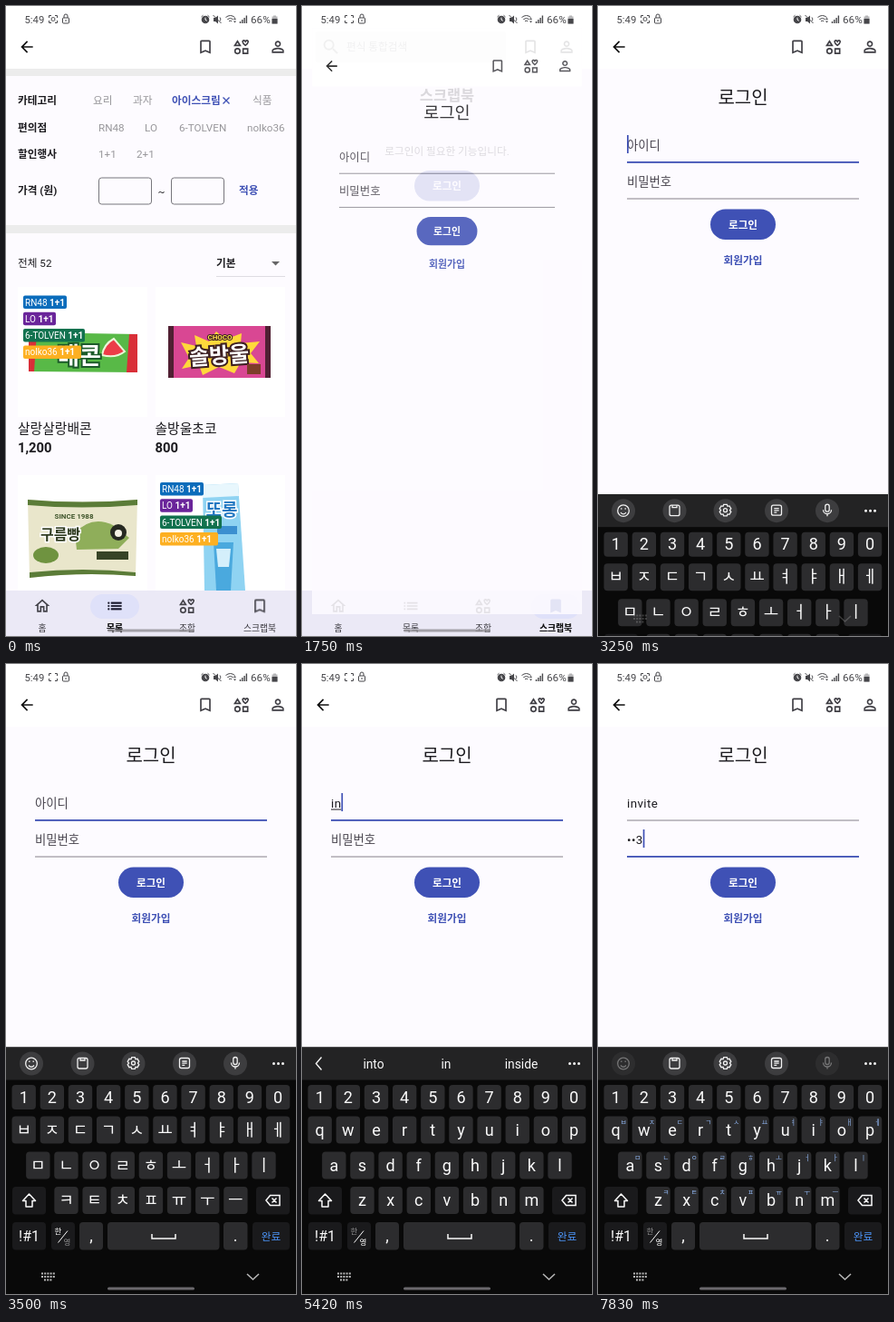
Write an HTML page that moves like this. It is 320x693 px and loops after 8 s.

```html
<!DOCTYPE html>
<html lang="ko">
<head>
<meta charset="utf-8">
<title>로그인</title>
<style>
html, body { margin: 0; width: 100%; height: 100%; overflow: hidden; background: #fdfbff; }
svg { display: block; }
#stage { width: 100vw; height: 100vh; }
text { font-family: Roboto, "Noto Sans CJK KR", "Noto Sans CJK JP", "Noto Sans CJK", sans-serif; white-space: pre; }
.s { font-size: 11.67px; fill: #1c1b1f; }
.m { font-size: 13.33px; fill: #49454f; }
.n { font-size: 14.8px; fill: #1c1b1f; }
.tiny { font-size: 9.8px; fill: #3a393f; }
.badge { font-size: 10px; fill: #fff; }
.b { font-weight: 700; }
.c { text-anchor: middle; }
.off { fill: #98979b; }
.blue { fill: #3f51b5; }
.white { fill: #fff; }
.ink { fill: #111; }
.line { fill: none; stroke: currentColor; }
.typed { font-size: 13.33px; letter-spacing: .4px; fill: #1c1b1f; }
.pack { font-weight: 700; text-anchor: middle; paint-order: stroke; }
.key { fill: #2c2c2e; }
.fn { fill: #1a1a1c; }
.key.down { fill: #58585c; }
.cap { font-size: 18px; fill: #fafafa; text-anchor: middle; }
.hint { font-size: 7.5px; fill: #8fb4ee; text-anchor: middle; }
.sug { font-size: 13.8px; fill: #fafafa; text-anchor: middle; }

#list, #book, #tapNav, #pill, #login, #kb, #sysKeys, #handle, #press { animation: 8s linear infinite; }
#list { animation-name: list; animation-timing-function: step-end; }
#book { animation-name: book; animation-timing-function: step-end; }
#rec { animation: rec 1s -.17s step-end infinite; }
#tapNav { animation-name: tapNav; }
#pill { animation-name: pill; transform-origin: 280px 660px; }
#press { animation-name: press; }
#login { animation-name: login; transform-origin: 160px 346px; }
#kb { animation-name: kb; }
#sysKeys { animation-name: sysKeys; }
#handle { animation-name: handle; }
@keyframes list { 0% { opacity: 1 } 6.25%, 100% { opacity: 0 } }
@keyframes book { 0% { opacity: 0 } 6.25%, 100% { opacity: 1 } }
@keyframes rec { 0% { opacity: 1 } 50%, 100% { opacity: 0 } }
@keyframes tapNav { 0%, 1% { opacity: 0 } 3%, 5.5% { opacity: .09 } 8%, 100% { opacity: 0 } }
@keyframes pill { 0%, 6.25% { transform: scaleX(.3); animation-timing-function: ease-out } 9.5%, 100% { transform: none } }
@keyframes press { 0%, 15% { opacity: 0 } 16.5%, 19% { opacity: .16 } 22%, 100% { opacity: 0 } }
@keyframes login {
  0%, 20.5% { opacity: 0; transform: scale(.88); animation-timing-function: ease-out }
  22.5% { opacity: 1 }
  25.5%, 100% { opacity: 1; transform: none }
}
@keyframes kb { 0%, 38.52% { transform: translateY(272px); animation-timing-function: ease-out } 43.77%, 100% { transform: none } }
@keyframes sysKeys { 0%, 39.4% { opacity: 0 } 43.75%, 100% { opacity: 1 } }
@keyframes handle { 0%, 38.4% { opacity: .75 } 38.6%, 42% { opacity: 0 } 43.75%, 100% { opacity: .75 } }
</style>
</head>
<body>
<svg id="stage" viewBox="0 0 320 693" preserveAspectRatio="none">
<defs>
  <symbol id="mark" viewBox="0 0 24 24"><path d="M17 3H7c-1.1 0-2 .9-2 2v16l7-3 7 3V5c0-1.1-.9-2-2-2zm0 15l-5-2.18L7 18V5h10v13z"/></symbol>
  <symbol id="markOn" viewBox="0 0 24 24"><path d="M17 3H7c-1.1 0-2 .9-2 2v16l7-3 7 3V5c0-1.1-.9-2-2-2z"/></symbol>
  <symbol id="person" viewBox="0 0 24 24"><path d="M12 5.9a2.1 2.1 0 110 4.2 2.1 2.1 0 010-4.2m0 9c2.97 0 6.1 1.46 6.1 2.1v1.1H5.9V17c0-.64 3.13-2.1 6.1-2.1M12 4C9.79 4 8 5.79 8 8s1.79 4 4 4 4-1.79 4-4-1.79-4-4-4zm0 9c-2.67 0-8 1.34-8 4v3h16v-3c0-2.66-5.33-4-8-4z"/></symbol>
  <symbol id="back" viewBox="0 0 24 24"><path d="M20 11H7.83l5.59-5.59L12 4l-8 8 8 8 1.41-1.41L7.83 13H20v-2z"/></symbol>
  <symbol id="find" viewBox="0 0 24 24"><path d="M15.5 14h-.79l-.28-.27A6.47 6.47 0 0016 9.5 6.5 6.5 0 109.5 16c1.61 0 3.09-.59 4.23-1.57l.27.28v.79l5 4.99L20.49 19l-4.99-5zm-6 0a4.5 4.5 0 110-9 4.5 4.5 0 010 9z"/></symbol>
  <symbol id="home" viewBox="0 0 24 24"><path d="M12 5.69l5 4.5V18h-2v-6H9v6H7v-7.81l5-4.5M12 3L2 12h3v8h6v-6h2v6h6v-8h3L12 3z"/></symbol>
  <symbol id="rows" viewBox="0 0 24 24"><path d="M3 13h2v-2H3zm0 4h2v-2H3zm0-8h2V7H3zm4 4h14v-2H7zm0 4h14v-2H7zM7 7v2h14V7z"/></symbol>
  <symbol id="shapes" viewBox="0 0 24 24"><path class="line" stroke-width="2" d="M6.5 4.5L10 10H3zM17 10c-5-3.500-4-6.500-2-6.500 1 0 1.600.600 2 1.300.400-.700 1-1.300 2-1.300 2 0 3 3-2 6.500zM14 14.500h6v6h-6z"/><circle class="line" stroke-width="2" cx="6.500" cy="17.500" r="3.300"/></symbol>
  <g id="bar">
    <rect width="320" height="69" fill="#fff"/>
    <use href="#back" x="13" y="35" width="20" height="20" fill="#111"/>
    <g fill="#3f3e44" color="#3f3e44">
      <use href="#mark" x="210" y="35" width="20" height="20"/>
      <use href="#shapes" x="250" y="35" width="20" height="20"/>
      <use href="#person" x="290" y="35" width="20" height="20"/>
    </g>
  </g>
  <rect id="nav" y="643" width="320" height="50" fill="#ebe9f6"/>
  <g id="navIcons" fill="#44434a" color="#44434a">
    <use href="#home" x="30" y="650" width="20" height="20"/>
    <use href="#rows" x="110" y="650" width="20" height="20"/>
    <use href="#shapes" x="190" y="650" width="20" height="20"/>
    <text class="tiny c" x="40" y="687.500">홈</text>
    <text class="tiny c" x="120" y="687.500">목록</text>
    <text class="tiny c" x="200" y="687.500">조합</text>
    <text class="tiny c" x="280" y="687.500">스크랩북</text>
  </g>
  <g id="btn">
    <rect x="124" y="181" width="72" height="33.500" rx="16.700" fill="#3f51b5"/>
    <text class="s b c white" x="160" y="202">로그인</text>
  </g>
</defs>

<rect width="320" height="693" fill="#fdfbff"/>

<g id="list">
  <use href="#bar"/>
  <path d="M0 69h320v8H0zM0 241h320v9H0z" fill="#ececec"/>
  <g class="s b">
    <text x="13" y="108">카테고리</text><text x="13" y="138">편의점</text>
    <text x="13" y="167">할인행사</text><text x="13" y="207">가격 (원)</text>
  </g>
  <svg width="308" height="250">
    <g class="s off">
      <text x="96" y="108">요리</text><text x="140" y="108">과자</text><text x="272" y="108">식품</text>
      <text x="102" y="138">RN48</text><text x="153" y="138">LO</text>
      <text x="191" y="138">6-TOLVEN</text><text x="266" y="138">nolko36</text>
      <text x="102" y="167">1+1</text><text x="144" y="167">2+1</text>
    </g>
    <text class="s b blue" x="183" y="108">아이스크림</text>
    <path d="M239.500 100.500l7 7m0-7l-7 7" stroke="#3f51b5" stroke-width="1.400"/>
  </svg>
  <g fill="none" stroke="#77767c"><rect x="102.500" y="189" width="58" height="29" rx="3"/><rect x="182.500" y="189" width="58" height="29" rx="3"/></g>
  <text class="s c" x="171.500" y="208">~</text>
  <text class="s b blue" x="257" y="207">적용</text>
  <text class="s" x="13" y="287">전체 52</text>
  <text class="s b" x="232" y="287">기본</text>
  <path d="M293 281h9l-4.500 4.500z" fill="#666"/><path d="M232 297.500h76" stroke="#dedce2"/>
  <path d="M13 309h143v143H13zM165 309h143v143H165zM13 516h143v143H13zM165 516h143v143H165z" fill="#fff"/>
  <g>
    <path d="M25 359l120 2v42l-120-1z" fill="#58b947"/>
    <path d="M25 359h9l-3 43h-6zM136 361h9v42h-12z" fill="#d92f38"/>
    <path d="M106 384q2-12 13-18l12 14q-10 8-25 4z" fill="#ec3c48" stroke="#eaf6d8" stroke-width="2"/>
    <text class="pack" x="81" y="394" font-size="26" fill="#fff" stroke="#1c5b2a" stroke-width="4">배콘</text>
  </g>
  <g>
    <path d="M179 352h113v57H179z" fill="#d94793"/>
    <path d="M179 352h6v57h-6zM286 352h6v57h-6z" fill="#502033"/>
    <path d="M193 370l17 4-2-12 16 7 8-11 10 9 18-7-1 11 21-2-10 13 9 11-20-1-7 12-17-7-18 9-4-11-19 4 8-12z" fill="#ffd83b"/>
    <text class="pack" x="236" y="367" font-size="8" fill="#ffe04a" stroke="#3c1f22" stroke-width="2">CHOCO</text>
    <text class="pack" x="235" y="393" font-size="24" fill="#fff" stroke="#3c1f22" stroke-width="4" transform="rotate(-4 236 382)">솔방울</text>
    <path d="M266 394h15v11h-15z" fill="#7d3d29"/>
  </g>
  <g>
    <path d="M24 543q60 5 121 0l-2 84q-58-5-117 2z" fill="#e9e6cb"/>
    <path d="M24 543q60 5 121 0v6q-62 5-121 0zM26 623q59-6 117 0v4q-58-5-117 2z" fill="#5b7c38"/>
    <text class="b c" x="75" y="564" font-size="8" fill="#40562c">SINCE 1988</text>
    <path d="M76 580q18-20 42-9l18 14-12 12-46 1z" fill="#8fae5a"/><circle cx="124" cy="579" r="9" fill="#262921"/><circle cx="124" cy="580" r="4" fill="#f4f1e4"/>
    <ellipse cx="44" cy="604" rx="14" ry="9" fill="#6f9340"/>
    <text class="pack" x="60" y="587" font-size="16" fill="#2f3b20" stroke="#fff" stroke-width="3">구름빵</text>
    <path d="M100 600h35v9h-35z" fill="#374326"/>
  </g>
  <g>
    <path d="M217 527l39-2 8 118h-45z" fill="#8fd3f2"/>
    <path d="M217 527l39-2 1 14-40 2z" fill="#e8f7fd"/>
    <path d="M229 590h22l-3 53h-16z" fill="#4aa9de"/><path d="M232 597h16l-2 20h-12z" fill="#d4effb"/>
    <text class="pack" x="238" y="561" font-size="19" fill="#2479c2" stroke="#fff" stroke-width="3">또롱</text>
    <path d="M233 572h22v9h-22z" fill="#3b8fd0"/>
  </g>
  <g id="badges"></g>
  <text class="n" x="13" y="469.500">살랑살랑배콘</text><text class="n" x="164.500" y="469.500">솔방울초코</text>
  <text class="n b" x="13" y="490.500">1,200</text><text class="n b" x="164.500" y="490.500">800</text>
  <use href="#nav"/>
  <rect x="93" y="647" width="54" height="27" rx="13.500" fill="#dfe1f9"/>
  <rect id="tapNav" x="253" y="647" width="54" height="27" rx="13.500" opacity="0"/>
  <use href="#navIcons"/>
  <use href="#rows" x="110" y="650" width="20" height="20" fill="#14142a"/>
  <text class="tiny b c ink" x="120" y="687.500">목록</text>
  <use href="#mark" x="270" y="650" width="20" height="20" fill="#44434a"/>
</g>

<g id="book">
  <rect width="320" height="69" fill="#fff"/>
  <rect x="15" y="28" width="210" height="34" rx="2" fill="#eee"/>
  <use href="#find" x="21" y="34" width="22" height="22" fill="#929292"/>
  <text class="s off" x="49" y="49">편식 통합검색</text>
  <use href="#mark" x="242" y="35" width="20" height="20" fill="#3f3e44"/>
  <use href="#person" x="282" y="35" width="20" height="20" fill="#3f3e44"/>
  <text class="b c" font-size="16.400" x="160" y="103.500">스크랩북</text>
  <text class="s c" x="160" y="164">로그인이 필요한 기능입니다.</text>
  <use href="#btn"/>
  <rect id="press" x="124" y="181" width="72" height="33.500" rx="16.700" fill="#fff" opacity="0"/>
  <use href="#nav"/>
  <rect id="pill" x="253" y="647" width="54" height="27" rx="13.500" fill="#dfe1f9"/>
  <use href="#navIcons"/>
  <use href="#markOn" x="270" y="650" width="20" height="20" fill="#3f51b5"/>
  <text class="tiny b c ink" x="280" y="687.500">스크랩북</text>
</g>

<g id="login">
  <rect width="320" height="693" fill="#fdfbff"/>
  <use href="#bar"/>
  <text class="c" font-size="20" x="160" y="107.500" fill="#1c1b1f">로그인</text>
  <text class="m" id="idLabel" x="32" y="158">아이디</text>
  <text class="m" id="pwLabel" x="32" y="198">비밀번호</text>
  <text class="typed" id="idText" x="32" y="158"></text>
  <rect id="compose" x="32" y="159.500" height="1" fill="#1c1b1f"/>
  <text class="typed" id="pwText" x="32" y="198"></text>
  <rect id="idLine" x="32" width="256"/>
  <rect id="pwLine" x="32" width="256"/>
  <rect id="caret" width="1.700" height="20" fill="#3f51b5"/>
  <use href="#btn" y="42.500"/>
  <text class="s b c blue" x="160" y="284">회원가입</text>
</g>

<g id="status" fill="#46464a" color="#46464a">
  <text font-size="11.300" x="20.500" y="18.500">5:49</text>
  <path class="line" d="M47.500 13v-2.500h2.500M54 10.500h2.500v2.500M56.500 16v2.500h-2.500M50 18.500h-2.500v-2.500"/>
  <rect id="rec" class="line" x="50.200" y="12.700" width="3.600" height="3.600" rx="1"/>
  <rect class="line" x="62.500" y="13" width="7" height="6" rx="1"/><path class="line" d="M64 13v-2a2 2 0 014 0v2M66 15v2"/>
  <circle cx="220" cy="15" r="4.300"/><path d="M215.500 12l2-1.800m5 0l2 1.800" class="line"/><path d="M220 12.700v2.500l1.700 1" stroke="#fff" fill="none"/>
  <path d="M229 13h2l3-2.500v9l-3-2.500h-2z"/><path class="line" d="M228.500 10l9 9M236 12.500q1.500 2 0 4"/>
  <path class="line" d="M242.500 12.500q5-4 10 0M244.300 14.700q3.200-2.500 6.400 0M246 16.700q1.500-1 3 0"/><path d="M251 15l1.500-2 1.500 2zm0 1.500l1.500 2 1.500-2z"/>
  <path class="line" stroke-width="1.400" d="M258.500 19v-2M260.800 19v-4M263.100 19v-6M265.400 19v-8.500"/>
  <text font-size="11.700" x="270" y="18.500">66%</text>
  <path d="M295 10.500h3v1h1.500v8h-6v-8H295z" opacity=".4"/><path d="M293.500 14h6v5.500h-6z"/>
</g>

<g id="kb">
  <rect y="421.500" width="320" height="272" fill="#090909"/>
  <rect y="421.500" width="320" height="36" fill="#232324"/>
  <g id="tools" fill="none" stroke="#f2f2f2" stroke-width="1.300">
    <g id="smile"><circle cx="28" cy="439.500" r="13" fill="#3d3d3f" stroke="none"/><circle cx="28" cy="439.500" r="6.300"/><path d="M25 441.500q3 3.500 6 0M25.800 436.500v1.500M30.200 436.500v1.500"/></g>
    <circle cx="84.500" cy="439.500" r="13" fill="#3d3d3f" stroke="none"/><rect x="79" y="433.500" width="11" height="11.500" rx="2"/><path d="M82 433.500v2.500h5v-2.500"/>
    <circle cx="140.500" cy="439.500" r="13" fill="#3d3d3f" stroke="none"/><path d="M138.700 432.700h3.600l.7 2 2-.4 1.800 3-1.400 1.700 1.400 1.700-1.800 3-2-.4-.7 2h-3.600l-.7-2-2 .4-1.800-3 1.400-1.700-1.400-1.700 1.800-3 2 .4z"/><circle cx="140.500" cy="439" r="2"/>
    <circle cx="197" cy="439.500" r="13" fill="#3d3d3f" stroke="none"/><rect x="191.500" y="433.500" width="11" height="11" rx="2"/><path d="M194.300 437h5.400M194.300 439.200h5.400M194.300 441.400h3"/>
    <g id="mic"><circle cx="253" cy="439.500" r="13" fill="#3d3d3f" stroke="none"/><rect x="250.800" y="432.500" width="4.400" height="8" rx="2.200"/><path d="M248.500 438.500a4.500 4.500 0 009 0M253 443v2.500"/></g>
  </g>
  <g id="words">
    <path d="M21.500 432.500l-6 7 6 7" fill="none" stroke="#f2f2f2" stroke-width="1.400"/>
    <text class="sug" x="79" y="444.500"></text><text class="sug" x="159" y="444.500"></text><text class="sug" x="242" y="444.500"></text>
  </g>
  <g id="more" fill="#f2f2f2"><circle cx="295.500" cy="439.500" r="1.500"/><circle cx="300.500" cy="439.500" r="1.500"/><circle cx="305.500" cy="439.500" r="1.500"/></g>
  <g id="keys"></g>
  <g fill="none" stroke="#fafafa" stroke-width="1.500">
    <path d="M25.500 583l-7 7.500h3.500v6.500h7v-6.500h3.500z" stroke-linejoin="round"/>
    <path d="M287 590l4.500-5.500h10.500v11h-10.500zM293.500 587.500l5 5m0-5l-5 5"/>
    <path d="M161 627v5h26v-5"/>
    <path d="M57.500 636.500l10.500-13" stroke-width="1"/>
  </g>
  <text class="cap" style="font-size:16px" x="25.500" y="635">!#1</text>
  <text class="cap" x="94" y="635">,</text><text class="cap" x="253" y="635">.</text>
  <text class="s c" style="fill:#4b93f5" x="292.500" y="633.500">완료</text>
  <text id="han" class="c" font-size="8.500" x="57.500" y="626.500" fill="#fff">한</text>
  <text id="eng" class="c" font-size="8.500" x="67.500" y="638.500" fill="#fff">영</text>
</g>
<g id="sysKeys" fill="none" stroke="#b9b9b9">
  <path d="M39 670.500h15M39 674h15M42 677.500h9" stroke-width="2" stroke-dasharray="2 1.200"/>
  <path d="M266 671l6.500 6 6.500-6" stroke-width="1.500"/>
</g>
<rect id="handle" x="112" y="685.500" width="96" height="3" rx="1.500" fill="#8c8a8f"/>
<circle id="dot" r="9" fill="#77777a"/>
</svg>

<script>
const $ = id => document.getElementById(id);
const add = (id, markup) => $(id).insertAdjacentHTML('beforeend', markup);
const show = (id, on) => $(id).style.display = on ? '' : 'none';
const LOOP = 8000;

// Store badges
const stores = [['RN48', 48, '#0a6cbb'], ['LO', 36, '#6a259a'], ['6-TOLVEN', 68, '#12724f'], ['nolko36', 64, '#fdb022']];
for (const [x, y] of [[19, 318.5], [170, 524]])
  stores.forEach(([name, w, color], i) => {
    const top = y + i * 18.3;
    add('badges', `<rect x="${x}" y="${top}" width="${w}" height="14.500" rx="2" fill="${color}"/>
      <text class="badge" x="${x + 2}" y="${top + 11}">${name} <tspan class="b">1+1</tspan></text>`);
  });

// Keyboard: first key centre, row centre, key height, characters per language
const rows = [
  [19.7, 476.5, 27, '1234567890', '1234567890'],
  [19.7, 512.5, 30, 'ㅂㅈㄷㄱㅅㅛㅕㅑㅐㅔ', 'qwertyuiop'],
  [35.3, 551.5, 30, 'ㅁㄴㅇㄹㅎㅗㅓㅏㅣ', 'asdfghjkl'],
  [66.5, 590, 30, 'ㅋㅌㅊㅍㅠㅜㅡ', 'zxcvbnm']
];
const place = {};
let ko = '', en = '', hints = '';
const cap = (x, y, c) => `<text class="cap" x="${x}" y="${y + 6.3}">${c}</text>`;
const plate = (x, y, w, h, cls, id = '') =>
  add('keys', `<rect class="${cls}" id="key-${id}" x="${x}" y="${y}" width="${w}" height="${h}" rx="4"/>`);
rows.forEach(([x0, y, h, kor, eng], r) => [...eng].forEach((c, i) => {
  const x = x0 + i * 31.15;
  place[c] = [x, y];
  plate(x - 13.2, y - h / 2, 26.4, h, 'key', c);
  ko += cap(x, y, kor[i]);
  en += cap(x, y, c);
  if (r) hints += `<text class="hint" x="${x + 8.5}" y="${y - 6}">${kor[i]}</text>`;
}));
[[7, 575, 37], [276, 575, 37], [7, 614, 37], [50, 614, 26], [272, 614, 41]]
  .forEach(([x, y, w], i) => plate(x, y, w, 30.5, 'fn', 'side' + i));
[[81, 26], [112, 123.5], [240, 26.5]].forEach(([x, w], i) => plate(x, 614, w, 30.5, 'key', 'low' + i));
add('keys', `<g id="korean">${ko}</g><g id="latin">${en}</g><g id="hints">${hints}</g>`);

const name = 'invite';
const nameTimes = [4900, 5150, 5460, 5700, 5920, 6130];
const pass = '123', passTimes = [7080, 7400, 7700];
const ID_FOCUS = 2920, ENGLISH = 4420, PW_FOCUS = 6560, PW_KEYS = 6660;
const guesses = [['it', 'I', 'is'], ['into', 'in', 'inside'], ['invest', 'inv', 'invent'],
  ['inviting', 'invi', 'invisible'], ['invited', 'invite', 'invites'], ['invitations', 'invite us', 'invite me']];
const strokes = [...name].map((c, i) => [nameTimes[i], c]).concat([...pass].map((c, i) => [passTimes[i], c]));
const taps = [[250, 280, 661], [1200, 160, 199], [2840, 120, 153], [4290, 55, 635], [6480, 110, 193],
  ...strokes.map(([t, c]) => [t, ...place[c]])];
const words = $('words').querySelectorAll('text');

function underline(id, y, on) {
  const el = $(id);
  el.setAttribute('y', on ? y - 1 : y - .5);
  el.setAttribute('height', on ? 1.8 : 1);
  el.setAttribute('fill', on ? '#3f51b5' : '#85828a');
}

function draw(t) {
  const n = nameTimes.filter(k => t >= k).length;
  const p = passTimes.filter(k => t >= k).length;
  const inPw = t >= PW_FOCUS, inId = t >= ID_FOCUS && !inPw;
  const english = t >= ENGLISH, secret = t >= PW_KEYS;

  // Fields
  $('idText').textContent = name.slice(0, n);
  $('pwText').textContent = p ? '•'.repeat(p - 1) + pass[p - 1] : '';
  show('idLabel', !n);
  show('pwLabel', !p);
  underline('idLine', 172, inId);
  underline('pwLine', 212, inPw);
  const width = n ? $('idText').getComputedTextLength() : 0;
  $('compose').setAttribute('width', inId ? width : 0);

  // Caret restarts its blink on each stroke
  const last = Math.max(...[ID_FOCUS, PW_FOCUS, ...nameTimes, ...passTimes].filter(k => t >= k), 0);
  show('caret', (inId || inPw) && (t - last) % 1000 < 500);
  $('caret').setAttribute('x', 32 + (inPw ? (p ? $('pwText').getComputedTextLength() : 0) : width));
  $('caret').setAttribute('y', inPw ? 182 : 142);

  // Keyboard
  show('korean', !english);
  show('latin', english);
  show('hints', secret);
  $('han').style.opacity = english ? .5 : 1;
  $('eng').style.opacity = english ? 1 : .5;
  const guessing = n > 0 && !secret;
  show('tools', !guessing);
  show('words', guessing);
  $('smile').style.opacity = $('mic').style.opacity = secret ? .4 : 1;
  $('more').style.opacity = t > 4230 && t < 4500 ? .35 : 1;
  if (guessing) {
    words.forEach((w, i) => w.textContent = guesses[n - 1][i]);
    words[2].style.opacity = Math.min(1, .4 + (t - last) / 400);
  }
  for (const c of Object.keys(place))
    $('key-' + c).classList.toggle('down', strokes.some(([k, s]) => s === c && t >= k && t < k + 110));

  // Touch dot
  const tap = taps.find(([k]) => t >= k && t < k + 125);
  show('dot', tap);
  if (tap) {
    $('dot').setAttribute('cx', tap[1]);
    $('dot').setAttribute('cy', tap[2]);
    $('dot').style.opacity = .5 * (1 - (t - tap[0]) / 250);
  }
}

let start;
function frame(now) {
  start ??= now;
  draw((now - start) % LOOP);
  requestAnimationFrame(frame);
}
requestAnimationFrame(frame);
</script>
</body>
</html>
```
